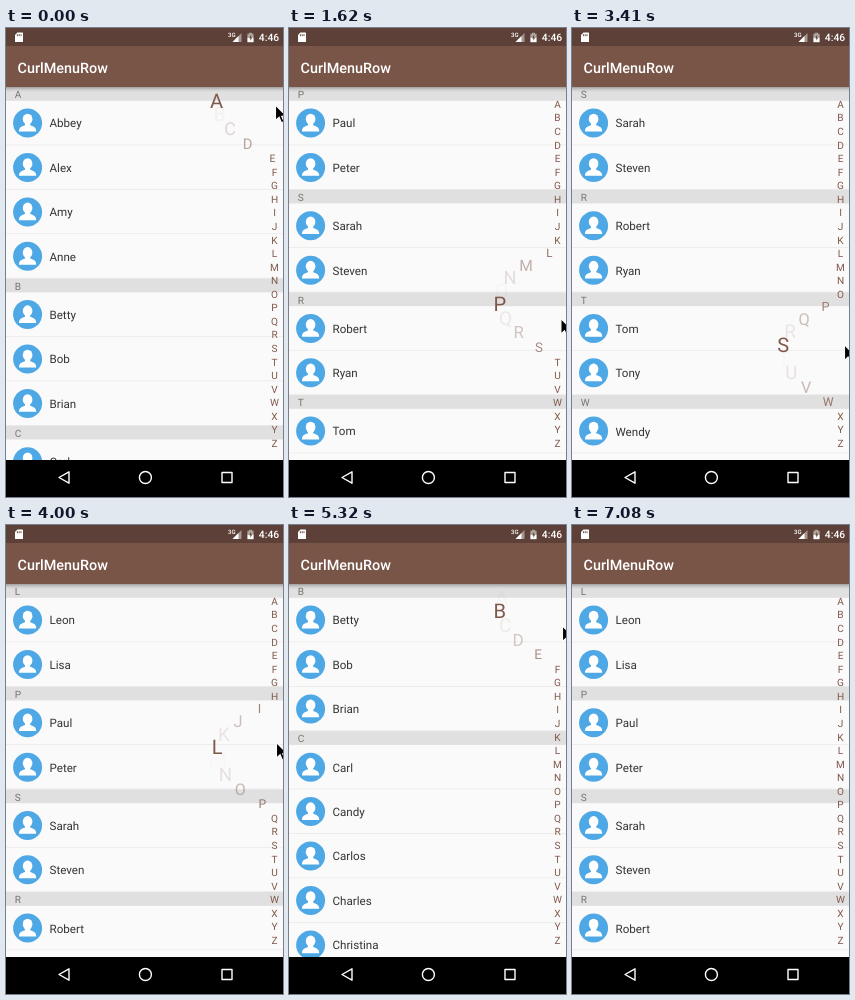
An HTML page for the animation above (7.47 s loop, 277 by 469 pixels).

```html
<!DOCTYPE html>
<html lang="en">
<head>
<meta charset="utf-8">
<title>Contact list with a wave index</title>
<style>
  html, body { margin: 0; width: 100%; height: 100%; overflow: hidden; background: #000; }
  svg { display: block; width: 100vw; height: 100vh; }
  text { font-family: Roboto, sans-serif; text-rendering: geometricPrecision; }
  .name { font-size: 11.6px; fill: #333; }
  .head { font-size: 10.1px; fill: #757575; }
  #index { fill: #80594c; text-anchor: middle; }
</style>
</head>
<body>
<svg viewBox="0 0 277 469">
  <defs>
    <clipPath id="view"><rect y="59" width="277" height="373"/></clipPath>
    <linearGradient id="shade" x2="0" y2="1">
      <stop offset="0" stop-color="#000" stop-opacity=".28"/>
      <stop offset=".5" stop-color="#000" stop-opacity=".1"/>
      <stop offset="1" stop-color="#000" stop-opacity="0"/>
    </linearGradient>
    <g id="avatar">
      <circle r="14.5" fill="#4ea8e6"/>
      <ellipse cy="-3.8" rx="4.8" ry="5.5" fill="#fff"/>
      <path d="M-8.6 8.4C-8.6 4.4-6.4 3.6-2.6 2.2V0H2.6V2.2C6.400 3.600 8.600 4.400 8.600 8.400Z" fill="#fff"/>
    </g>
  </defs>

  <rect y="59" width="277" height="373" fill="#fafafa"/>
  <g clip-path="url(#view)"><g id="list"></g></g>
  <rect y="59" width="277" height="5" fill="url(#shade)"/>

  <rect width="277" height="18.5" fill="#5d4037"/>
  <rect y="18" width="277" height="41" fill="#795548"/>
  <text x="11.6" y="45" font-size="14.4" font-weight="500" fill="#fff">CurlMenuRow</text>

  <g fill="#fff">
    <path d="M11.4 4.6H16.4Q17 4.6 17 5.2V13.4Q17 14 16.4 14H9.6Q9 14 9 13.4V7Z"/>
    <path d="M11.4 6.2V8.2M13.2 6.2V8.2M15 6.2V8.2" stroke="#5d4037" stroke-width=".9"/>
    <text x="222" y="9.4" font-size="6" font-weight="500">3G</text>
    <path d="M235.5 5V14H226.5Z" fill-opacity=".45"/>
    <path d="M232.5 8V14H226.5Z"/>
    <path d="M241.4 5.8H243V4.8H246V5.8H247.600V9.500H241.400Z" fill-opacity=".5"/>
    <path d="M241.4 9.500H247.600V14.200H241.400Z"/>
    <path d="M245 7L243.2 10.3H244.4V12.8L246.2 9.5H245Z" fill="#5d4037"/>
    <text x="252.8" y="13.2" font-size="10.3" font-weight="500">4:46</text>
  </g>

  <g id="index"></g>

  <rect y="432" width="277" height="37" fill="#000"/>
  <g fill="none" stroke="#fff" stroke-width="1.4" stroke-linejoin="round">
    <path d="M53 449.5L63 443.8V455.2Z"/>
    <circle cx="139.4" cy="449.5" r="6"/>
    <rect x="216" y="444.5" width="10" height="10"/>
  </g>

  <path id="cursor" d="M0 0V15.5L3.6 12.2L6 17.7L8.6 16.6L6.2 11.2H11Z"
        fill="#000" stroke="#fff" stroke-width="1.1"/>
</svg>

<script>
const ROW = 44.44, HEAD = 13.8, TOP = 59, BOTTOM = 432;
const STEP = 13.56, BAR_X = 268.5, BASE_Y = 79.9, SIZE = 10.1, PULL = 58;
const LOOP = 7470;
const ABC = 'ABCDEFGHIJKLMNOPQRSTUVWXYZ';

const groups = [
  'Abbey Alex Amy Anne', 'Betty Bob Brian', 'Carl Candy Carlos Charles Christina',
  'David Daniel', 'Elizabeth Eric', 'Frances Frank', 'Ivy', 'James John Jessica',
  'Karen Karl Kim', 'Leon Lisa', 'Paul Peter', 'Sarah Steven', 'Robert Ryan',
  'Tom Tony', 'Wendy Will William', 'Zoe'
];

// [step, value...] keys, read linearly between
const fingerKeys = [[0, .07], [6, 7.93], [16, 21.48], [17, 20.2], [22, 11.44],
  [28.5, 0], [30, .1], [31, .74], [35, 6.25], [38, 11]];
const cursorKeys = [[0, 269.5, 77], [6, 270, 195.5], [15, 273.5, 366.5], [16, 273.5, 366.5],
  [22, 270.5, 217.5], [28, 272, 75], [29.5, 272, 75], [31, 273.5, 101], [35, 243.2, 187],
  [37, 236, 222], [40, 234, 226.5], [41, 214, 335], [42, 195, 456], [43, 190, 485]];

const $ = id => document.getElementById(id);

// Build the list and remember where each section starts
const starts = {};
let y = TOP, html = '';
for (const group of groups) {
  const letter = group[0];
  starts[letter] = y - TOP;
  html += `<rect y="${y}" width="277" height="${HEAD}" fill="#e0e0e0"/>
    <text class="head" x="8.7" y="${y + 11.3}">${letter}</text>`;
  y += HEAD;
  for (const name of group.split(' ')) {
    const mid = y + ROW / 2;
    html += `<use href="#avatar" x="21.6" y="${mid}"/>
      <text class="name" x="43.5" y="${mid + 4.45}">${name}</text>
      <rect y="${y + ROW - .7}" width="277" height=".7" fill="#e8e8e8"/>`;
    y += ROW;
  }
}
$('list').innerHTML = html;
const maxScroll = y - BOTTOM;

$('index').innerHTML = [...ABC].map(c => `<text>${c}</text>`).join('');
const letters = [...$('index').children];

function read(keys, n) {
  let i = 1;
  while (i < keys.length - 1 && n > keys[i][0]) i++;
  const a = keys[i - 1], b = keys[i];
  const p = Math.min(1, (n - a[0]) / (b[0] - a[0]));
  return a.slice(1).map((v, k) => v + (b[k + 1] - v) * p);
}

function stepAt(t) {
  if (t < 140) return 0;
  if (t < 3260) return Math.min(16, 1 + Math.floor((t - 140) / 148));
  return Math.min(43, 17 + Math.floor((t - 3260) / 146.9));
}

// A letter without a section keeps the last section passed
function scrollFor(index, up) {
  let i = index;
  while (!(ABC[i] in starts)) i += up ? 1 : -1;
  return Math.min(maxScroll, starts[ABC[i]]);
}

function draw(t) {
  const n = stepAt(t);
  const [finger] = read(fingerKeys, n);
  const [cx, cy] = read(cursorKeys, n);
  const current = Math.floor(finger + .5);
  const touching = n < 39;

  $('list').setAttribute('transform', `translate(0 ${-scrollFor(current, n > 16 && n < 30)})`);
  letters.forEach((el, i) => {
    const d = i - finger;
    const scale = touching ? Math.max(0, 1 - d * d / 16) : 0;
    el.setAttribute('x', BAR_X - PULL * scale);
    el.setAttribute('y', BASE_Y + STEP * i);
    el.setAttribute('font-size', SIZE * (1 + scale));
    el.setAttribute('fill-opacity', touching && i === current ? 1 : 1 - scale);
  });
  $('cursor').setAttribute('transform', `translate(${cx} ${cy})`);
}

const begin = performance.now();
function tick() {
  draw((performance.now() - begin) % LOOP);
  requestAnimationFrame(tick);
}
tick();
</script>
</body>
</html>
```
